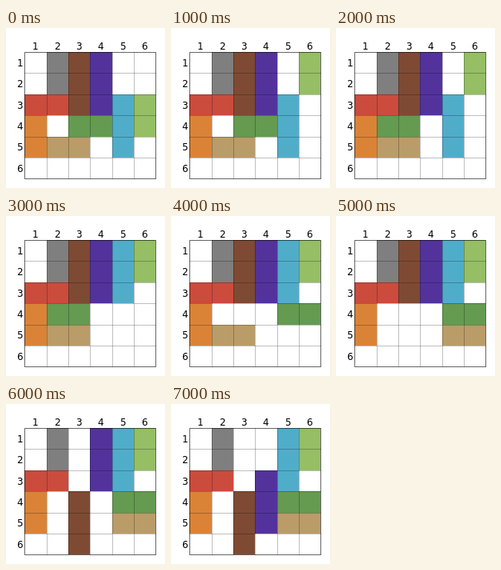
An HTML page for the animation above (8 s loop, 199 by 200 pixels).

```html
<!DOCTYPE html>
<html lang="en">
<head>
<meta charset="utf-8">
<title>Sliding blocks</title>
<style>
html, body { margin: 0; width: 100%; height: 100%; overflow: hidden; background: #fff; }
svg { display: block; width: 199px; height: 200px; }
text { font: 12px "DejaVu Sans", sans-serif; }
</style>
</head>
<body>
<svg id="board" viewBox="0 0 199 200"></svg>
<script>
const X = [23, 51, 78, 105, 133, 160, 187];
const Y = [30, 56, 83, 109, 136, 162, 188];
const STEP = 1000, LOOP = 8000;

// color, column, row, columns wide, rows high
const blocks = {
  gray:   ['#7f7f7f', 1, 0, 1, 2],
  brown:  ['#7f4a33', 2, 0, 1, 3],
  purple: ['#53339b', 3, 0, 1, 3],
  red:    ['#cb4b3d', 0, 2, 2, 1],
  orange: ['#da8336', 0, 3, 1, 2],
  tan:    ['#ba9c68', 1, 4, 2, 1],
  green:  ['#659a51', 2, 3, 2, 1],
  blue:   ['#50adca', 4, 2, 1, 3],
  lime:   ['#95be65', 5, 2, 1, 2]
};

// one move per step: block, new column, new row
const moves = [
  ['lime', 5, 0],
  ['green', 1, 3],
  ['blue', 4, 0],
  ['green', 4, 3],
  ['tan', 4, 4],
  ['brown', 2, 3],
  ['purple', 3, 2]
];

const board = document.getElementById('board');

function add(tag, attrs, text = '') {
  const el = document.createElementNS('http://www.w3.org/2000/svg', tag);
  for (const key in attrs) el.setAttribute(key, attrs[key]);
  el.textContent = text;
  return board.appendChild(el);
}

function place(el, col, row, w, h) {
  el.setAttribute('x', X[col]);
  el.setAttribute('y', Y[row]);
  el.setAttribute('width', X[col + w] - X[col]);
  el.setAttribute('height', Y[row + h] - Y[row]);
}

const rects = {};
for (const name in blocks) rects[name] = add('rect', { fill: blocks[name][0] });

for (let i = 1; i < 6; i++) {
  const line = { stroke: '#000', 'stroke-opacity': 0.25 };
  add('path', { d: `M${X[i] + 0.5} 30V189`, ...line });
  add('path', { d: `M23 ${Y[i] + 0.5}H188`, ...line });
}
add('rect', { x: 23.5, y: 30.5, width: 164, height: 158, fill: 'none', stroke: '#000', 'stroke-opacity': 0.6 });

for (let i = 0; i < 6; i++) {
  add('text', { x: Math.round(33.4 + i * 27.33), y: 27 }, i + 1);
  add('text', { x: 14, y: Math.round(48 + i * 26.33) }, i + 1);
}

let shown = -1;
function draw(now) {
  const step = Math.floor((now % LOOP) / STEP);
  if (step !== shown) {
    shown = step;
    const spots = {};
    for (const name in blocks) spots[name] = blocks[name].slice(1, 3);
    for (const [name, col, row] of moves.slice(0, step)) spots[name] = [col, row];
    for (const name in blocks) place(rects[name], ...spots[name], ...blocks[name].slice(3));
  }
}

let start;
function tick(now) {
  start ??= now;
  draw(now - start);
  requestAnimationFrame(tick);
}
draw(0);
requestAnimationFrame(tick);
</script>
</body>
</html>
```
